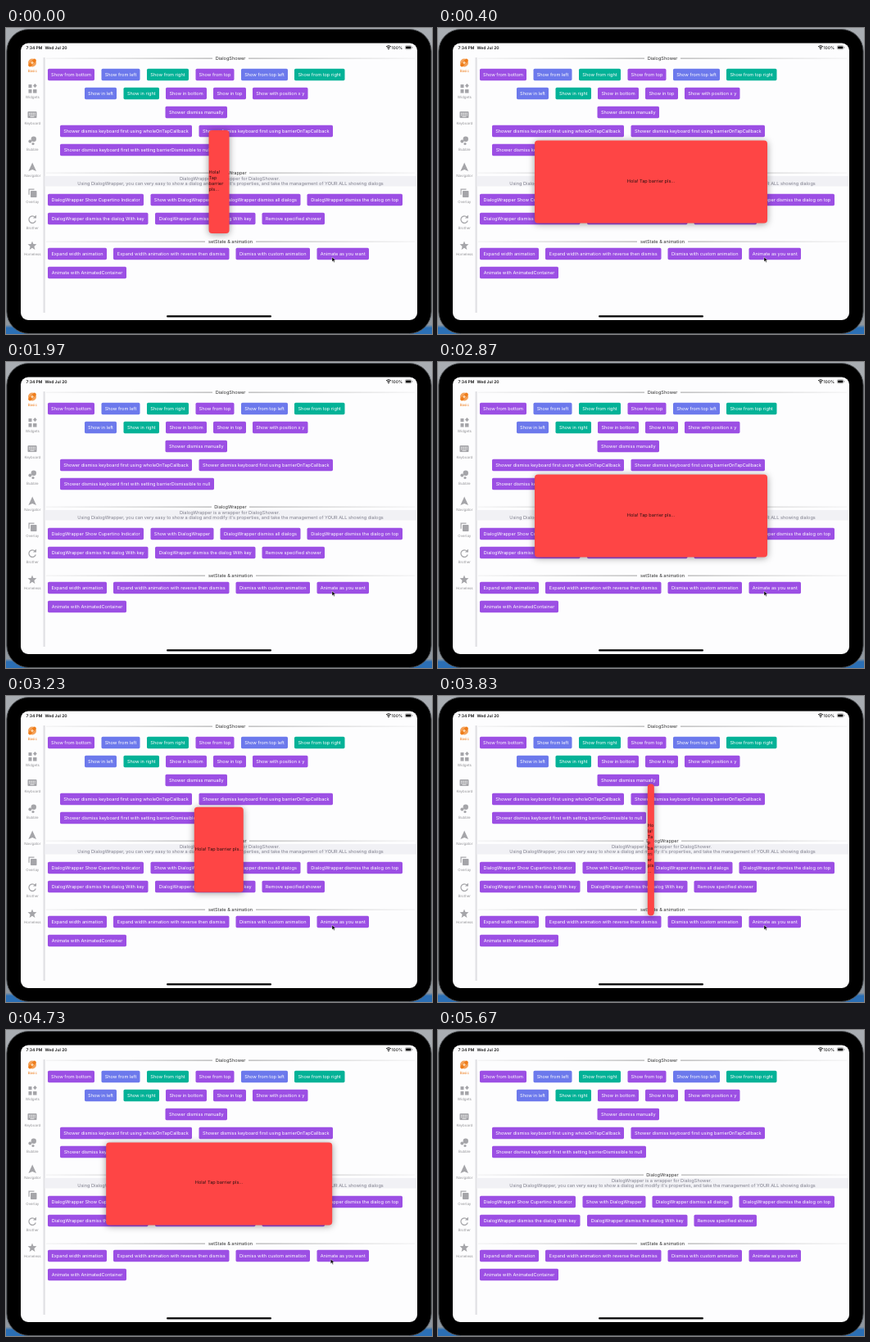
Write an HTML page that moves like this. It is 520x374 px and loops after 5710 ms.

```html
<!DOCTYPE html>
<html>
<head>
<meta charset="utf-8">
<style>
html, body { margin: 0; width: 100%; height: 100%; overflow: hidden; background: #000; }
body { position: relative; font: 5.6px/7px Inter, Roboto, sans-serif; text-rendering: geometricPrecision; }
svg { position: absolute; left: 0; top: 0; display: block; }
#dialog {
  position: absolute; left: 260px; top: 188px; box-sizing: border-box;
  transform: translate(-50%, -50%); border-radius: 4px;
  background: #fe4545; color: #2a1010; box-shadow: 0 1px 8px rgba(0, 0, 0, .4);
}
#dialog span { display: block; width: fit-content; margin: 0 auto; overflow-wrap: anywhere; }
</style>
</head>
<body>
<svg id="stage" width="520" height="374" viewBox="0 0 520 374">
  <defs>
    <linearGradient id="desk" x2="0" y2="1">
      <stop offset="0" stop-color="#a9adb2"/><stop offset=".97" stop-color="#8f979f"/><stop offset=".98" stop-color="#2b6fb5"/>
    </linearGradient>
    <linearGradient id="fadeIn"><stop stop-color="#999" stop-opacity=".15"/><stop offset="1" stop-color="#888"/></linearGradient>
    <linearGradient id="fadeOut"><stop stop-color="#888"/><stop offset="1" stop-color="#999" stop-opacity=".15"/></linearGradient>
    <linearGradient id="side"><stop stop-color="#fdfdfe"/><stop offset="1" stop-color="#d3d3d8"/></linearGradient>
  </defs>
  <rect width="520" height="374" fill="url(#desk)"/>
  <rect x=".8" y="1.5" width="518.4" height="372" rx="27" stroke="#55585c"/>
  <rect x="18" y="18.5" width="484" height="338.5" rx="9" fill="#fdfdfe"/>
  <rect x="44.5" y="36" width="3" height="312" fill="url(#side)"/>
  <rect x="47.5" y="181" width="454" height="12.5" fill="#f1f1f5"/>
  <rect x="196" y="351.3" width="128" height="2.2" rx="1.1"/>
  <g id="status">
    <path d="M464 22.8q3-2.6 6 0M465.1 24.1q1.9-1.6 3.8 0" fill="none" stroke="#111" stroke-width=".9"/>
    <circle cx="467" cy="25.4" r=".8"/>
    <rect x="487.3" y="21.7" width="7.6" height="4.2" rx="1.2" fill="none" stroke="#777" stroke-width=".5"/>
    <rect x="488" y="22.4" width="6.2" height="2.8" rx=".6"/>
    <path d="M495.8 23v1.6"  stroke="#777" stroke-width=".7"/>
  </g>
  <g id="icons" fill="#a5a5a9" stroke="none">
    <g transform="translate(32 42.5)">
      <circle r="5" fill="#f4a25a"/>
      <rect x="-6" y="-2" width="12" height="4" rx="2" transform="rotate(-45)" fill="#ee7d1b"/>
      <path d="M-2 0L0-2L2 0L0 2Z" fill="#fbd4ac"/>
    </g>
    <path d="M27.5 69h4v4h-4zM33 70.5l2.4-2.4 2.4 2.4-2.4 2.4zM27.5 75h4v4.5h-4zM33 75h4.5v4.5H33z"/>
    <g transform="translate(32 106)">
      <rect x="-5.5" y="-4" width="11" height="8" rx="1"/>
      <path d="M-4-1.8H4M-4 .2H4" stroke="#fff" stroke-width="1" stroke-dasharray="1.1 .6"/>
      <path d="M-2.5 2.3h5" stroke="#fff" stroke-width=".8"/>
    </g>
    <circle cx="33.8" cy="135.8" r="3.2"/><circle cx="29.4" cy="138.5" r="2"/><circle cx="33" cy="141.5" r="1.6"/>
    <path d="M32.2 164.5L37 175L32.2 173L27.4 175Z"/>
    <path d="M27.5 196.5h7v1.2h-5.8v6h-1.2z"/><rect x="30" y="199" width="7.5" height="8" rx=".8"/>
    <path d="M35.4 231.2A4.3 4.3 0 1 0 36.3 235.5" fill="none" stroke="#a5a5a9" stroke-width="1.2"/>
    <path d="M37 228.5v4h-4z"/>
    <path d="M32 260.5l1.4 3.5 4 .3-3 2.6 1 4-3.4-2.2-3.4 2.2 1-4-3-2.6 4-.3z"/>
  </g>
</svg>
<div id="dialog"><span>Hola! Tap barrier pls...</span></div>
<svg width="520" height="374"><path id="cursor" d="M0 0V5.6L1.4 4.4L2.4 6.5L3.3 6L2.4 4H4.2Z" stroke="#fff" stroke-width=".4"/></svg>
<script>
const stage = document.getElementById('stage');
const dialog = document.getElementById('dialog');
const cursor = document.getElementById('cursor');

function add(tag, attrs, text = '') {
  const el = document.createElementNS('http://www.w3.org/2000/svg', tag);
  for (const k in attrs) el.setAttribute(k, attrs[k]);
  el.textContent = text;
  stage.append(el);
}
const label = (text, x, y, fill, more = {}) =>
  add('text', { x, y: y + 2, fill, 'text-anchor': 'middle', ...more }, text);

// Rows of buttons: centre y, then [left, right, text, colour]
const PURPLE = '#9c4fe4', BLUE = '#6c79ec', TEAL = '#03b297';
const rows = [
  [57, [51, 108, 'Show from bottom'], [116.5, 163.5, 'Show from left', BLUE], [172, 223, 'Show from right', TEAL],
    [231.5, 278.5, 'Show from top'], [287, 344, 'Show from top left', BLUE], [352, 413.5, 'Show from top right', TEAL]],
  [80, [96, 135, 'Show in left', BLUE], [143.5, 187, 'Show in right', TEAL], [195, 245, 'Show in bottom'],
    [253, 293, 'Show in top'], [301, 368.5, 'Show with position x y']],
  [103, [194.5, 270, 'Shower dismiss manually']],
  [126, [66, 227, 'Shower dismiss keyboard first using wholeOnTapCallback'],
    [235.5, 399, 'Shower dismiss keyboard first using barrierOnTapCallback']],
  [149, [66, 254, 'Shower dismiss keyboard first with setting barrierDismissible to null']],
  [210, [51, 168, 'DialogWrapper Show Cupertino Indicator'], [176.5, 253.5, 'Show with DialogWrapper'],
    [261.5, 359.5, 'DialogWrapper dismiss all dialogs'], [367.5, 484, 'DialogWrapper dismiss the dialog on top']],
  [233, [51, 173.5, 'DialogWrapper dismiss the dialog With key'],
    [182, 304.5, 'DialogWrapper dismiss the dialog With key'], [312.5, 389, 'Remove specified shower']],
  [276, [51, 123, 'Expand width animation'], [131, 272.5, 'Expand width animation with reverse then dismiss'],
    [280.5, 371, 'Dismiss with custom animation'], [379.5, 443, 'Animate as you want']],
  [299, [51, 147, 'Animate with AnimatedContainer']]
];
for (const [y, ...buttons] of rows)
  for (const [l, r, text, fill = PURPLE] of buttons) {
    add('rect', { x: l, y: y - 7.2, width: r - l, height: 14.4, rx: 1.6, fill });
    label(text, (l + r) / 2, y, '#fff');
  }

for (const [text, y, half] of [['DialogShower', 37, 22], ['DialogWrapper', 177, 23], ['setState & animation', 261, 31]]) {
  add('rect', { x: 49, y: y - .3, width: 225 - half, height: .8, fill: 'url(#fadeIn)' });
  add('rect', { x: 274 + half, y: y - .3, width: 225 - half, height: .8, fill: 'url(#fadeOut)' });
  label(text, 274, y, '#333');
}
label('DialogWrapper is a wrapper for DialogShower.', 273, 184, '#80808e');
label("Using DialogWrapper, you can very easy to show a dialog and modify it's properties, and take the management of YOUR ALL showing dialogs",
  274, 190.3, '#80808e');

['Basic', 'Widgets', 'Keyboard', 'Bubble', 'Navigator', 'Overlay', 'Brother', 'Homeless'].forEach((text, i) =>
  label(text, 32.3, 51.5 + i * 32.1, i ? '#929296' : '#ee7d1b', { 'font-size': 4.4 }));

const bar = { 'font-size': 5, 'font-weight': 600 };
label('7:34 PM', 34.5, 23.8, '#111', bar);
label('Wed Jul 20', 61, 23.8, '#111', bar);
label('100%', 477.3, 23.8, '#111', { ...bar, 'font-weight': 500 });

// Opening and closing times of the dialog, in ms
const LOOP = 5710, DURATION = 400;
const cycles = [[-72, 813], [2020, 2950], [3790, 4690]];
const ease = u => { u = Math.min(1, Math.max(0, u)); return u * u * (3 - 2 * u); };

function draw(now) {
  const t = now % LOOP;
  const p = cycles.reduce((sum, [open, close]) =>
    sum + ease((t - open) / DURATION) - ease((t - close) / DURATION), 0);
  dialog.style.display = p > .002 ? 'block' : 'none';
  dialog.style.width = 284 * p + 'px';
  dialog.style.padding = 47 + 2.2 * (1 - p) + 'px 0';
  cursor.setAttribute('transform', `translate(${398 - 1.7 * ease((t - 3950) / 250)} 280)`);
  cursor.style.display = t < 5400 ? 'inline' : 'none';
}
const start = performance.now();
function tick() {
  draw(performance.now() - start);
  requestAnimationFrame(tick);
}
tick();
</script>
</body>
</html>
```
